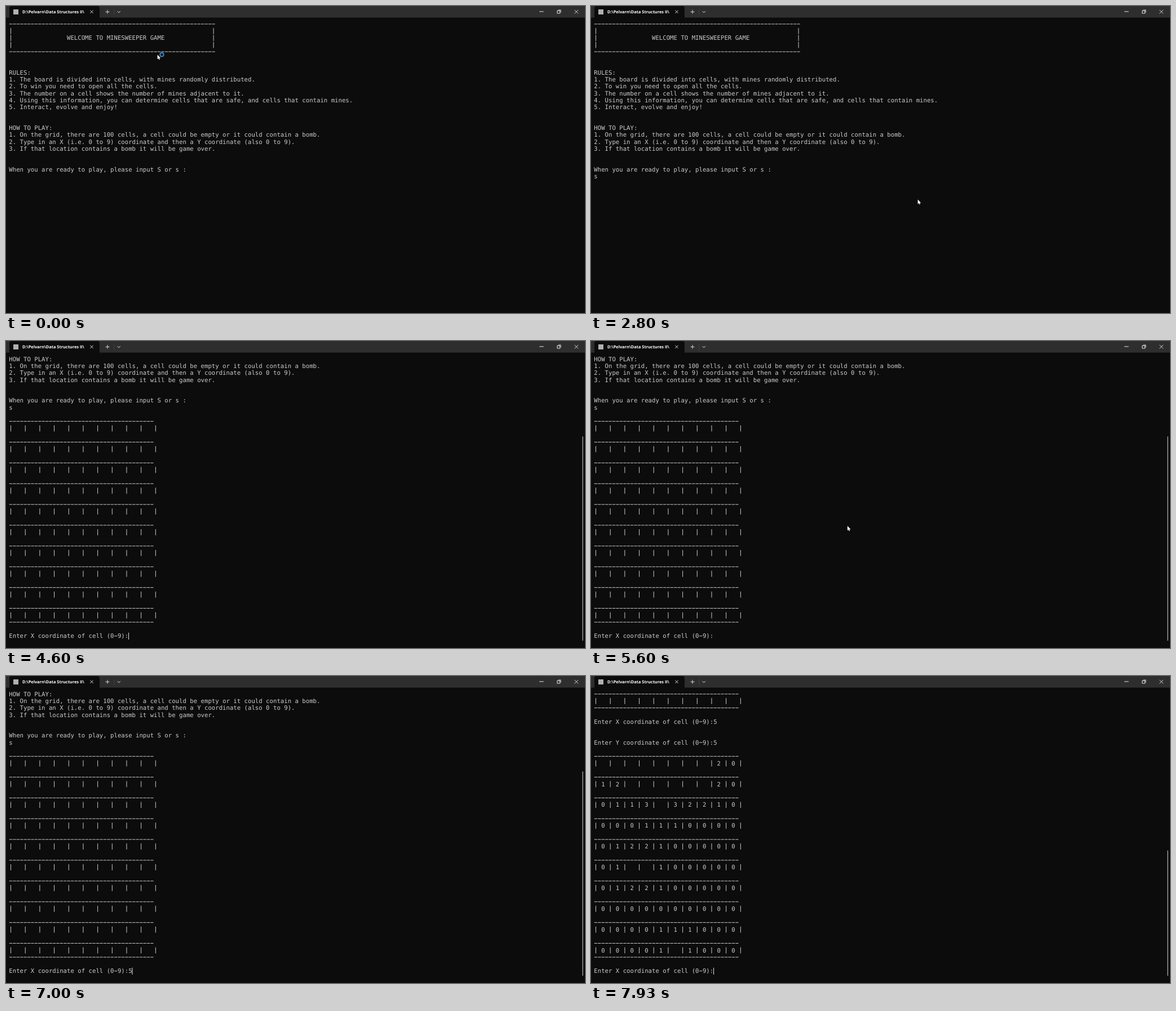
These frames come from a looping animation (1027x545 px, 8 s). An HTML page with a canvas:

```html
<!DOCTYPE html>
<html lang="en">
<head>
<meta charset="utf-8">
<title>Console game</title>
<style>
  html, body { margin: 0; width: 100%; height: 100%; overflow: hidden; background: #0c0c0c; }
  canvas { display: block; }
</style>
</head>
<body>
<canvas id="stage" width="1027" height="545"></canvas>
<script>
const ctx = document.getElementById('stage').getContext('2d');
const LOOP = 8000, TICK = 1000 / 15, BLINK = 8 * TICK;
const COL = 6.42, ROW = 12.293, LEFT = 5.3, TOP = 25.9, ROWS = 41;
const INK = '#cccccc', PAPER = '#0c0c0c', ICON = '#e6e6e6';
const SIZE = 10;

const WELCOME_RULE = '-'.repeat(57);
const WELCOME_SIDE = '|' + ' '.repeat(55) + '|';
const BOARD_RULE = '-'.repeat(4 * SIZE);
const ASK_X = 'Enter X coordinate of cell (0-9):';
const ASK_Y = ASK_X.replace('X', 'Y');

const INTRO = [
  WELCOME_RULE,
  WELCOME_SIDE,
  '|' + ' '.repeat(15) + 'WELCOME TO MINESWEEPER GAME' + ' '.repeat(13) + '|',
  WELCOME_SIDE,
  WELCOME_RULE,
  '', '',
  'RULES:',
  '1. The board is divided into cells, with mines randomly distributed.',
  '2. To win you need to open all the cells.',
  '3. The number on a cell shows the number of mines adjacent to it.',
  '4. Using this information, you can determine cells that are safe, and cells that contain mines.',
  '5. Interact, evolve and enjoy!',
  '', '',
  'HOW TO PLAY:',
  '1. On the grid, there are 100 cells, a cell could be empty or it could contain a bomb.',
  '2. Type in an X (i.e. 0 to 9) coordinate and then a Y coordinate (also 0 to 9).',
  '3. If that location contains a bomb it will be game over.',
  '', '',
  'When you are ready to play, please input S or s :'
];

// Mines as row * SIZE + column.
const MINES = new Set([0, 7, 12, 14, 16, 17, 24, 52, 53, 95]);

function neighbours(cell) {
  const row = Math.floor(cell / SIZE), col = cell % SIZE, found = [];
  for (let r = Math.max(0, row - 1); r <= Math.min(SIZE - 1, row + 1); r++)
    for (let c = Math.max(0, col - 1); c <= Math.min(SIZE - 1, col + 1); c++)
      found.push(r * SIZE + c);
  return found;
}

// Opens a cell and spreads through every connected cell without mines around it.
function openFrom(cell, cells) {
  if (cells[cell] !== ' ') return cells;
  const around = neighbours(cell);
  cells[cell] = around.filter(n => MINES.has(n)).length;
  if (cells[cell] === 0) around.forEach(n => openFrom(n, cells));
  return cells;
}

function board(cells) {
  const lines = [];
  for (let i = 0; i < cells.length; i += SIZE)
    lines.push('', BOARD_RULE, '|' + cells.slice(i, i + SIZE).map(c => ` ${c} |`).join(''));
  return [...lines, BOARD_RULE, ''];
}

const emptyCells = () => Array(SIZE * SIZE).fill(' ');
const CLOSED = board(emptyCells());
const OPENED = board(openFrom(55, emptyCells()));

// Everything printed or typed up to time t; the caret sits after the last line.
function consoleLines(t) {
  const lines = [...INTRO, t >= 2270 ? 's' : ''];
  if (t >= 4600) lines.push(...CLOSED, ASK_X + (t >= 7000 ? '5' : ''));
  if (t >= 7330) lines.push('', '', ASK_Y + (t >= 7530 ? '5' : ''));
  if (t >= 7930) lines.push(...OPENED, ASK_X);
  return lines;
}

// The caret blinks evenly and restarts lit whenever the console is busy.
const CARET_RESTARTS = [266, 2266, 4733, 6930, 7330, 7530];

function caretLit(t) {
  const since = CARET_RESTARTS.filter(s => s <= t).pop();
  return since !== undefined && Math.floor((t - since + 1) / BLINK) % 2 === 0;
}

// Pointer moves along quadratic curves; typing hides it for a while.
const GLIDES = [
  { start: 533, end: 867, path: [[268, 86], [405, 162], [543, 238]] },
  { start: 1000, end: 1333, path: [[543, 238], [735, 290], [579, 343]] },
  { start: 5533, end: 5733, path: [[579, 343], [400, 320], [178, 300]] },
  { start: 5933, end: 6400, path: [[178, 300], [261, 267], [411, 319]] }
];
const HIDDEN = [[2200, 2670], [4470, 5600], [6930, LOOP]];

function pointerAt(time) {
  const t = Math.floor((time + 3.4) / TICK) * TICK;
  const { start, end, path: [a, b, c] } = GLIDES.filter(g => g.start <= t).pop() || GLIDES[0];
  const u = Math.min(1, Math.max(0, (t - start) / (end - start))), v = 1 - u;
  return a.map((_, i) => v * v * a[i] + 2 * u * v * b[i] + u * u * c[i]);
}

function rect(color, x, y, w, h) {
  ctx.fillStyle = color;
  ctx.fillRect(x, y, w, h);
}

function stroke(color, width, ...lines) {
  ctx.strokeStyle = color;
  ctx.lineWidth = width;
  ctx.beginPath();
  for (const line of lines) line.forEach(([x, y], i) => i ? ctx.lineTo(x, y) : ctx.moveTo(x, y));
  ctx.stroke();
}

const cross = (x, y, r) => stroke(ICON, 0.9,
  [[x - r, y - r], [x + r, y + r]], [[x - r, y + r], [x + r, y - r]]);

function drawTitleBar() {
  rect('#2e2e2e', 0, 0, 1027, 20.6);
  ctx.fillStyle = PAPER;
  ctx.beginPath();
  ctx.roundRect(6, 0, 160, 24, 4);
  ctx.fill();

  rect('#b0b0b0', 13, 6, 9, 9);
  ctx.font = '700 7.4px "Open Sans", sans-serif';
  ctx.fillStyle = '#ffffff';
  ctx.fillText('D:\\Pelvarn\\Data Structures II\\', 29, 13.2);
  cross(152, 10.3, 2.7);

  stroke(ICON, 0.9, [[176.5, 10.4], [183.5, 10.4]], [[180, 6.9], [180, 13.9]]);
  rect('#484848', 191, 5, 0.8, 11);
  stroke(ICON, 1, [[197.6, 9.2], [200.2, 11.8], [202.8, 9.2]]);

  rect(ICON, 946, 9.4, 7.6, 1);
  ctx.strokeRect(977.8, 8.4, 4.6, 4.6);
  stroke(ICON, 0.9, [[979.3, 7], [984, 7], [984, 11.8]]);
  cross(1011.7, 10.2, 3.3);
}

function drawLine(text, row) {
  const top = TOP + row * ROW;
  ctx.fillStyle = INK;
  [...text].forEach((ch, i) => {
    const x = LEFT + i * COL;
    if (ch === '-') ctx.fillRect(x + 0.5, top + 5.6, 5.4, 1);
    else if (ch === '|') ctx.fillRect(x + 2.75, top + 0.9, 1, 10.8);
    else if (ch !== ' ') ctx.fillText(ch, x, top + 9.8);
  });
}

function drawConsole(t) {
  const lines = consoleLines(t);
  const first = Math.max(0, lines.length - ROWS), last = lines.length - 1;
  ctx.font = '10.66px "DejaVu Sans Mono", monospace';
  lines.slice(first).forEach(drawLine);

  if (caretLit(t))
    rect('#e8e8e8', LEFT + lines[last].length * COL - 0.1, TOP + (last - first) * ROW + 0.2, 1, 12.2);

  if (first) {
    const top = 28, bottom = 532;
    const thumb = bottom - (bottom - top) * ROWS / (lines.length + 1);
    rect('#9a9a9a', 1022.2, thumb, 1.5, bottom - thumb);
  }
}

function drawPointer(t) {
  if (HIDDEN.some(([from, to]) => t >= from && t < to)) return;
  const [x, y] = pointerAt(t);
  const shape = [[0, 0], [0, 8.2], [1.9, 6.6], [3.1, 9.2], [4.4, 8.6], [3.3, 6.1], [5.8, 6]];
  ctx.beginPath();
  shape.forEach(([dx, dy]) => ctx.lineTo(x + 0.6 + dx, y + 0.4 + dy));
  ctx.closePath();
  ctx.strokeStyle = '#000000';
  ctx.lineWidth = 0.8;
  ctx.stroke();
  ctx.fillStyle = '#ffffff';
  ctx.fill();
  if (t < 600) {
    ctx.beginPath();
    ctx.arc(x + 8.4, y + 0.4, 3.2, 0, Math.PI * 2);
    ctx.strokeStyle = '#3f8fd6';
    ctx.lineWidth = 1.8;
    ctx.stroke();
  }
}

function render(now) {
  const t = now % LOOP;
  ctx.textRendering = 'geometricPrecision';
  rect(PAPER, 0, 0, 1027, 545);
  drawTitleBar();
  drawConsole(t);
  drawPointer(t);
}

let start;
function tick(now) {
  start ??= now;
  render(now - start);
  requestAnimationFrame(tick);
}
render(0);
requestAnimationFrame(tick);
</script>
</body>
</html>
```
